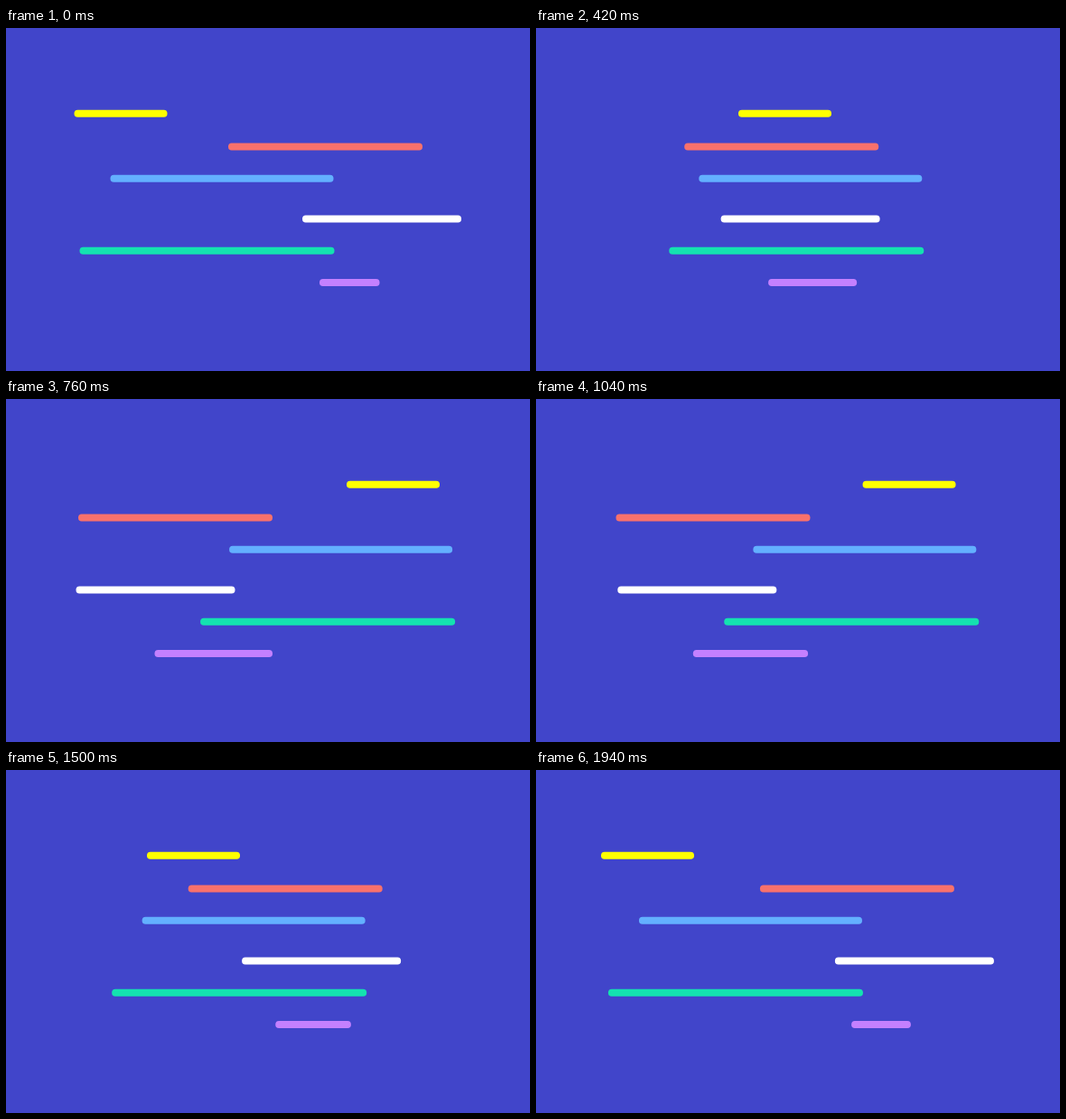
An HTML page for the animation above (1.96 s loop, 580 px wide and 380 px high).

```html
<!DOCTYPE html>
<html lang="en">
<head>
<meta charset="utf-8">
<title>Sliding bars</title>
<style>
  html, body { margin: 0; width: 100%; height: 100%; overflow: hidden; background: #4145ca; }
  svg { display: block; width: 580px; height: 380px; }
</style>
</head>
<body>
<svg id="stage" viewBox="0 0 580 380"></svg>
<script>
const LOOP = 1960, STEP = 20;

// Shared track: [time in ms, left edge of the top bar]
const track = [
  [0, 75.5], [260, 141], [420, 224], [520, 293], [640, 366], [760, 377],
  [860, 380.5], [960, 377], [980, 373.5], [1240, 312], [1400, 224.5],
  [1500, 156], [1620, 82.5], [1740, 72], [1840, 68.5], [1940, 72]
];

// Position, width, then how far each travels over the track's unit span
const bars = [
  { color: '#ffff00', x: 75.5,  y: 90.7,  w: 103,  dx: 301.5,  dw: 0 },
  { color: '#f8716c', x: 246,   y: 127.5, w: 215,  dx: -166,   dw: 0 },
  { color: '#63b0ff', x: 115.5, y: 162.8, w: 247,  dx: 131.6,  dw: 0 },
  { color: '#ffffff', x: 328,   y: 207.5, w: 176,  dx: -250.5, dw: 0 },
  { color: '#14e2b0', x: 81.5,  y: 242.7, w: 282,  dx: 133.6,  dw: 0 },
  { color: '#c480ff', x: 347,   y: 278,   w: 66.5, dx: -182.5, dw: 64 }
];

const count = track.length;
const knot = i => {
  const turn = Math.floor(i / count);
  const [t, v] = track[i - turn * count];
  return [t + turn * LOOP, v];
};
const slope = i => {
  const [t0, v0] = knot(i), [t1, v1] = knot(i + 1);
  return (v1 - v0) / (t1 - t0);
};
// Harmonic mean keeps the curve from overshooting its knots
const tangent = i => {
  const a = slope(i - 1), b = slope(i);
  return a * b > 0 ? 2 * a * b / (a + b) : 0;
};

function progress(time) {
  let i = count - 1;
  while (track[i][0] > time) i--;
  const [t0, v0] = knot(i), [t1, v1] = knot(i + 1);
  const h = t1 - t0, u = (time - t0) / h, r = 1 - u;
  const value = r * r * (1 + 2 * u) * v0 + u * u * (3 - 2 * u) * v1
    + h * u * r * (r * tangent(i) - u * tangent(i + 1));
  return (value - 75.5) / 301.5;
}

const stage = document.getElementById('stage');
for (const bar of bars) {
  bar.node = document.createElementNS('http://www.w3.org/2000/svg', 'rect');
  const attrs = { y: bar.y, height: 8, rx: 3.8, fill: bar.color };
  for (const name in attrs) bar.node.setAttribute(name, attrs[name]);
  stage.append(bar.node);
}

function draw(time) {
  const p = progress(time);
  for (const { node, x, w, dx, dw } of bars) {
    node.setAttribute('x', (x + dx * p).toFixed(2));
    node.setAttribute('width', (w + dw * p).toFixed(2));
  }
}

const start = performance.now();
function tick() {
  const time = (performance.now() - start) % LOOP;
  draw(Math.floor(time / STEP) * STEP);
  requestAnimationFrame(tick);
}
draw(0);
requestAnimationFrame(tick);
</script>
</body>
</html>
```
